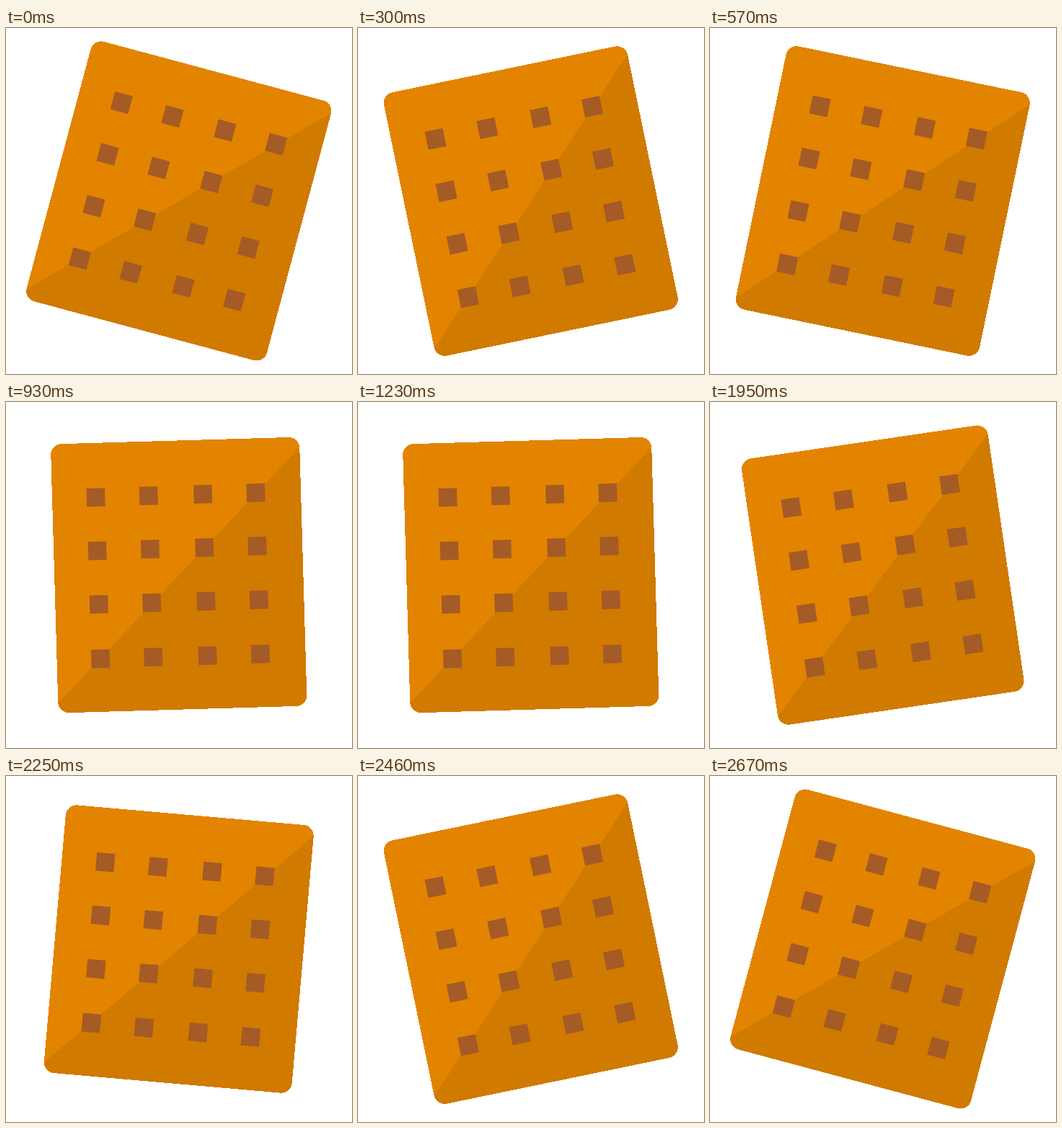
Recreate the animation shown at these times as an HTML page. Size 480 by 480 pixels, loop 2.7 s.

```html
<!DOCTYPE html>
<html lang="en">
<head>
<meta charset="utf-8">
<title>Rocking cracker</title>
<style>
  @property --tilt {
    syntax: "<angle>";
    inherits: false;
    initial-value: 15deg;
  }
  html, body {
    margin: 0;
    width: 100%;
    height: 100%;
    overflow: hidden;
    background: #fff;
  }
  svg {
    display: block;
    width: 100vw;
    height: 100vh;
  }
  .cracker {
    transform: rotate(var(--tilt));
    animation: rock 2700ms steps(9) -2ms infinite;
  }
  .light, .dark { shape-rendering: crispEdges; }
  .light { fill: #e38400; }
  .dark { fill: #d07a00; }
  .holes { fill: #a55b25; }

  /* Five swings; the last one snaps upright a step early. */
  @keyframes rock {
    0%, 20%, 40%, 60%, 80% { --tilt: 15deg; }
    10%, 30%, 50%, 70% { --tilt: -15deg; }
    90% { --tilt: -15deg; animation-timing-function: steps(8); }
    98.889% { --tilt: 11.667deg; animation-timing-function: steps(1, jump-start); }
    100% { --tilt: 15deg; }
  }
</style>
</head>
<body>
<svg viewBox="-240 -240 480 480">
  <defs>
    <rect id="hole" x="-12.75" y="-12.75" width="25.5" height="25.5"/>
    <g id="row">
      <use href="#hole" x="-112.3"/>
      <use href="#hole" x="-39"/>
      <use href="#hole" x="36.4"/>
      <use href="#hole" x="109.7"/>
    </g>
  </defs>
  <g class="cracker">
    <rect class="light" x="-172.8" y="-186.5" width="345.15" height="373.1" rx="15"/>
    <path class="dark" d="M172.35-172.3V171.6A15 15 0 0 1 157.35 186.6H-157.8A15 15 0 0 1-172.75 172.7Z"/>
    <g class="holes">
      <use href="#row" y="-111"/>
      <use href="#row" y="-37"/>
      <use href="#row" y="37.5"/>
      <use href="#row" y="112.9"/>
    </g>
  </g>
</svg>
</body>
</html>
```
